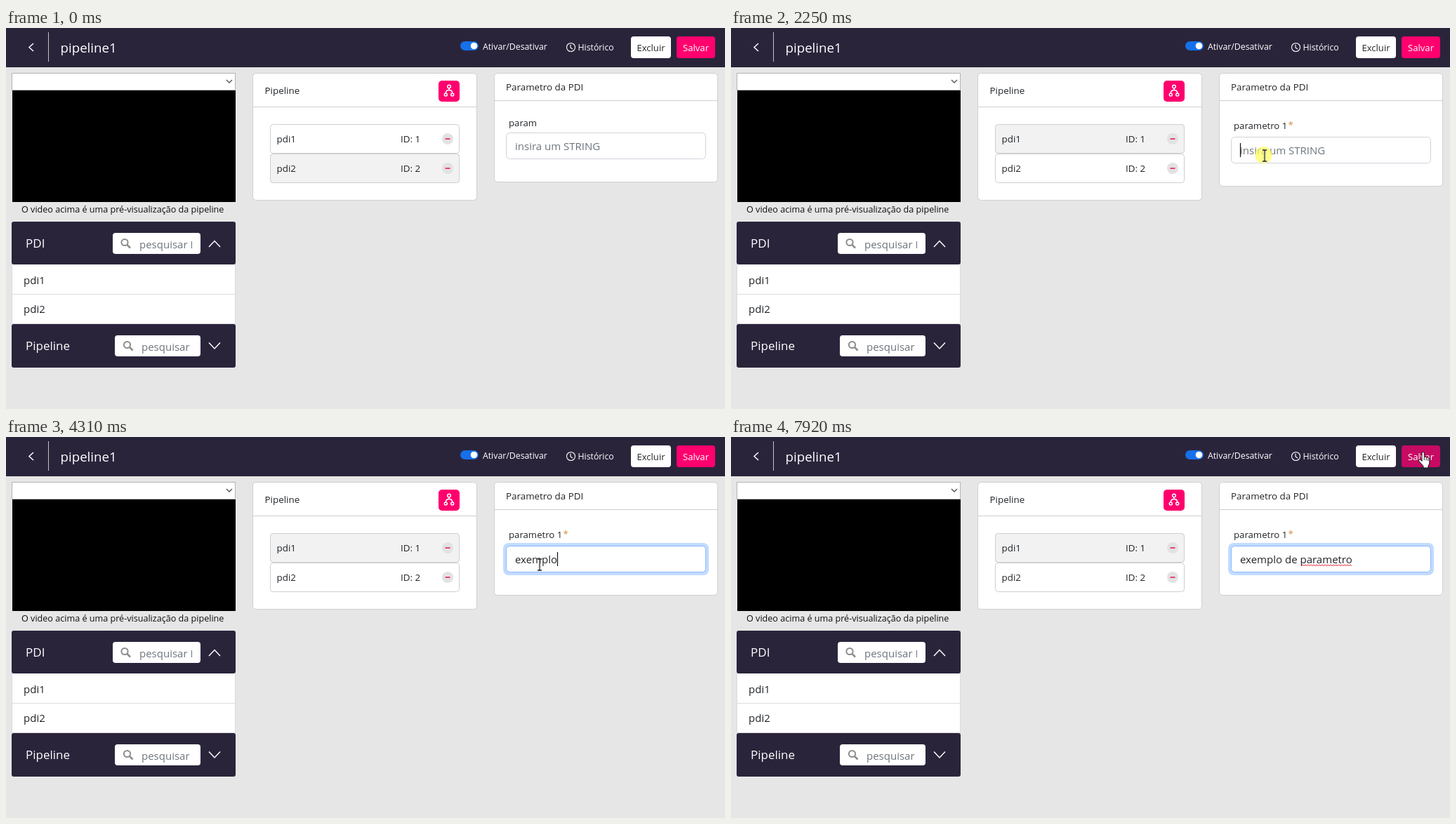
An HTML page that plays this animation: 1024x543 px, repeating every 8 s.

```html
<!DOCTYPE html>
<html lang="pt">
<head>
<meta charset="utf-8">
<title>Pipeline</title>
<style>
html, body { margin: 0; width: 100%; height: 100%; overflow: hidden; background: #e6e6e6; }
svg.stage { display: block; width: 100%; height: 100%; }
text { font: 13.4px "Open Sans", "Noto Sans", sans-serif; fill: #212529; white-space: pre; }
.small { font-size: 12.3px; }
.field { font-size: 15px; }
.head { font-size: 17px; }
.title { font-size: 18.7px; }
.label { font-size: 13.2px; }
.mid { text-anchor: middle; font-size: 13.1px; }
.white { fill: #fff; }
.hint { fill: #6c757d; }
.dark { fill: #2a243b; }
.card { fill: #fff; stroke: #cfcfcf; }
.line { fill: none; stroke: #fff; stroke-width: 1.5; }
.input { fill: #fff; stroke: #ced4da; }
.option { font-size: 11.3px; font-weight: 700; fill: #90909a; }

.before, .after, .arrow, .hand, .beam, .wave { animation: 8s step-end infinite; }
.before { animation-name: before; }
.after { animation-name: after; }
.arrow { animation-name: arrow; }
.hand { animation-name: hand; }
.beam { animation-name: beam; }
.wave { animation-name: wave; }
.focus { animation: focus 8s linear infinite; }
.menu { animation: menu 8s linear infinite; }
.press { animation: press 8s linear infinite; }
.save { animation: save 8s linear infinite; }
.pointer { animation: move 8s ease-in-out infinite; }

@keyframes before { 0% { opacity: 1 } 18.6%, 100% { opacity: 0 } }
@keyframes after { 0% { opacity: 0 } 18.6%, 100% { opacity: 1 } }
@keyframes arrow { 0% { opacity: 1 } 10.5% { opacity: 0 } 21.8% { opacity: 1 } 23.3% { opacity: 0 } 85.4% { opacity: 1 } 98%, 100% { opacity: 0 } }
@keyframes hand { 0% { opacity: 0 } 10.5% { opacity: 1 } 21.8% { opacity: 0 } 98%, 100% { opacity: 1 } }
@keyframes beam { 0% { opacity: 0 } 23.3% { opacity: 1 } 85.4%, 100% { opacity: 0 } }
@keyframes wave { 0% { opacity: 0 } 83.875%, 100% { opacity: 1 } }
@keyframes focus { 0%, 28.4% { opacity: 0 } 30.1%, 100% { opacity: 1 } }
@keyframes menu { 0%, 28.8% { opacity: 0 } 30.1%, 37.3% { opacity: 1 } 39.6%, 100% { opacity: 0 } }
@keyframes press {
  0%, 16.9% { opacity: 0 } 17.1%, 18.2% { opacity: 1 } 18.8%, 28.1% { opacity: 0 }
  28.12%, 28.7% { opacity: .85 } 29.8%, 100% { opacity: 0 }
}
@keyframes save { 0%, 98% { fill: #ff006e } 98.9%, 100% { fill: #c70a63 } }
@keyframes move {
  0%, 4.2% { transform: translate(930px, 565px) }
  4.25% { transform: translate(926px, 535px); animation-timing-function: cubic-bezier(.35, .15, .35, 1) }
  14.125%, 14.5% { transform: translate(551px, 174px) }
  17.1%, 18.9% { transform: translate(536px, 159px); animation-timing-function: cubic-bezier(.5, 0, .8, .8) }
  21.6% { transform: translate(636px, 138px); animation-timing-function: cubic-bezier(.2, .2, .5, 1) }
  24.5%, 24.8% { transform: translate(757px, 180px) }
  25.625%, 83.8% { transform: translate(758.5px, 181px) }
  85.4% { transform: translate(753px, 194px) }
  90.5%, 93.3% { transform: translate(772px, 250px) }
  99%, 100% { transform: translate(983px, 21px) }
}
</style>
</head>
<body>
<svg class="stage" viewBox="0 0 1024 543">
  <defs>
    <g id="minus">
      <circle r="8" fill="#e2e2e4"/>
      <path d="M-3.5 0h7" stroke="#e8345f" stroke-width="1.8"/>
    </g>
    <g id="lens" fill="none" stroke="#8d8d8d" stroke-width="2">
      <circle r="4.6"/>
      <path d="M3.4 3.4L8 8" stroke-width="2.6"/>
    </g>
  </defs>

  <!-- top bar -->
  <rect class="dark" width="1024" height="56"/>
  <path class="line" d="M39 22l-6 5.5 6 5.5"/>
  <path d="M60.5 6v42" stroke="#c3c1c9"/>
  <text class="title white" x="77.5" y="35">pipeline1</text>
  <rect x="647" y="19" width="26" height="13" rx="6.5" fill="#1670ea"/>
  <circle cx="666.5" cy="25.5" r="4.8" fill="#fff"/>
  <text class="small white" x="679" y="31">Ativar/Desativar</text>
  <g class="line" style="stroke-width:1.1">
    <circle cx="804.5" cy="27.5" r="6"/>
    <path d="M804 23.5v4.5l3 2"/>
  </g>
  <text class="small white" x="814.5" y="32">Histórico</text>
  <rect x="890" y="12" width="57" height="31" rx="4" fill="#fff"/>
  <text class="mid" x="918.5" y="33">Excluir</text>
  <rect class="save" x="955" y="12" width="55" height="31" rx="4" fill="#ff006e"/>
  <text class="mid white" x="982.5" y="33">Salvar</text>

  <!-- left column -->
  <rect x="8.5" y="64.5" width="318" height="24" fill="#fff" stroke="#b4b4b4"/>
  <path d="M314 74l4 4 4-4" fill="none" stroke="#555" stroke-width="1.4"/>
  <rect x="9" y="89" width="318" height="159"/>
  <text x="22" y="263" style="font-size:12.6px;fill:#111">O video acima é uma pré-visualização da pipeline</text>

  <rect x="8.5" y="336.5" width="318" height="85" fill="#fff" stroke="#dcdce0"/>
  <path d="M9 379.5h317" stroke="#dcdce0"/>
  <text class="field" x="25" y="365">pdi1</text>
  <text class="field" x="25" y="406">pdi2</text>

  <rect class="dark" x="8" y="276" width="319" height="61" rx="3"/>
  <text class="head white" x="28" y="313">PDI</text>
  <rect x="152" y="292" width="125" height="30" rx="4" fill="#fff"/>
  <use href="#lens" x="169" y="305.5"/>
  <svg x="190" y="292" width="75" height="30"><text class="field hint" y="22">pesquisar PDI</text></svg>
  <path class="line" d="M289 312l8-8.5 8 8.5"/>

  <rect class="dark" x="8" y="422" width="319" height="62" rx="3"/>
  <text class="head white" x="28" y="459">Pipeline</text>
  <rect x="155" y="438" width="122" height="30" rx="4" fill="#fff"/>
  <use href="#lens" x="172.5" y="451.5"/>
  <svg x="193" y="438" width="71" height="30"><text class="field hint" y="22">pesquisar Pipeline</text></svg>
  <path class="line" d="M289 448.500l8 8.500 8-8.500"/>

  <!-- pipeline card -->
  <rect class="card" x="351.5" y="64.500" width="319" height="181" rx="5"/>
  <path d="M352 112.500h318" stroke="#cfcfcf"/>
  <text x="368.500" y="94">Pipeline</text>
  <rect x="616" y="75" width="30" height="30" rx="5" fill="#ff006e"/>
  <g class="line">
    <circle cx="631" cy="83.500" r="2.300"/>
    <circle cx="626.300" cy="95" r="2"/>
    <circle cx="635.700" cy="95" r="2"/>
    <path d="M631 86v2.500M626.300 93c0-3 2-4.500 4.700-4.500s4.700 1.500 4.700 4.500"/>
  </g>
  <rect class="card" x="376.500" y="137.500" width="269" height="41" rx="4"/>
  <rect class="card" x="376.500" y="179.500" width="269" height="41" rx="4"/>
  <rect class="card after" x="376.500" y="137.500" width="269" height="41" rx="4" style="fill:#f2f2f2"/>
  <rect class="card before" x="376.500" y="179.500" width="269" height="41" rx="4" style="fill:#f2f2f2"/>
  <text x="385.500" y="163">pdi1</text>
  <text x="562" y="163">ID: 1</text>
  <use href="#minus" x="629" y="158"/>
  <text x="385.500" y="205">pdi2</text>
  <text x="562" y="205">ID: 2</text>
  <use href="#minus" x="629" y="200"/>

  <!-- parameter card -->
  <g class="before">
    <rect class="card" x="695.500" y="64.500" width="318" height="155" rx="5"/>
    <text class="label" x="716" y="140">param</text>
    <rect class="input" x="712.500" y="149.500" width="284" height="37" rx="5"/>
    <text class="field hint" x="725" y="174">insira um STRING</text>
  </g>
  <g class="after">
    <rect class="card" x="695.500" y="64.500" width="318" height="161" rx="5"/>
    <text class="label" x="716" y="144">parametro 1</text>
    <text class="label" x="793.500" y="143" style="fill:#d98a3d">*</text>
    <rect class="input" x="712.500" y="155.500" width="284" height="37" rx="5"/>
    <g class="focus">
      <rect x="708" y="151" width="293" height="46" rx="8" fill="#c2dbfe"/>
      <rect x="712.500" y="155.500" width="284" height="37" rx="5" fill="#fff" stroke="#86b7fe"/>
    </g>
    <text class="field hint" id="hint" x="725" y="180">insira um STRING</text>
    <text class="field" id="typed" x="725" y="180"></text>
    <path id="caret" d="M.5 164v20" stroke="#111" stroke-width="1.200"/>
    <path class="wave" id="wave" fill="none" stroke="#e8262d" stroke-width="1"/>
  </g>
  <path d="M696 103.500h317" stroke="#cfcfcf"/>
  <text x="712" y="89">Parametro da PDI</text>

  <g class="menu" id="menu">
    <rect x="713" y="197" width="286" height="158.500" rx="3" fill="#fff" style="filter:drop-shadow(0 1px 2px #0005)"/>
  </g>

  <!-- pointer -->
  <g class="pointer">
    <circle class="press" r="12" fill="#ffff58" opacity="0" fill-opacity=".85"/>
    <path class="arrow" d="M0 0V16.500L3.800 13l2.500 5.800 2.600-1.100L6.500 12h5.200z" fill="#fff" stroke="#000"/>
    <g class="hand" stroke="#111" fill="#fff" stroke-linejoin="round">
      <path d="M1 2.500Q1-.2 2.700.2 4.300.5 4.300 2.500V7.500Q6.200 6.200 7.200 8.300 9 7.200 9.700 9 11.800 8.400 11.800 11V16Q11.800 18 10 20V23H3V20.500L-3 13.800Q-4.500 11.600-2.800 11-1 10.600 1 13.500z"/>
      <path d="M4.300 8v4M7.200 9v3.500M9.700 10v3" fill="none" stroke-width=".9"/>
    </g>
    <g class="beam" fill="none">
      <path id="bar" d="M-1.500-7h2.200q.8 0 .8 1V8q0 1-.8 1h-2.200M4.500-7H2.300q-.8 0-.8 1M4.500 9H2.300q-.8 0-.8-1" stroke="#fff" stroke-width="2.600"/>
      <path d="M-1.500-7h2.200q.8 0 .8 1V8q0 1-.8 1h-2.200M4.500-7H2.300q-.8 0-.8 1M4.500 9H2.300q-.8 0-.8-1" stroke="#111" stroke-width="1.300"/>
    </g>
  </g>
</svg>
<script>
const LOOP = 8000, FOCUS = 2250, BLINK = 535, LEFT = 725;
const phrase = "exemplo de parametro";
const keys = [2990, 3130, 3650, 3750, 3980, 4080, 4310, 4410, 4510, 4610,
  4720, 4820, 4920, 5120, 5220, 5450, 5630, 5880, 6040, 6170];
const [hint, typed, caret, wave, menu] =
  ["hint", "typed", "caret", "wave", "menu"].map(id => document.getElementById(id));

["a", "c", "25x30", "b"].forEach((word, i) => {
  const option = document.createElementNS("http://www.w3.org/2000/svg", "text");
  option.setAttribute("class", "option");
  option.setAttribute("x", LEFT);
  option.setAttribute("y", 226.5 + 36 * i);
  option.textContent = word;
  menu.append(option);
});

wave.setAttribute("d", "M812 183.500" + "l2-1.500 2 1.500".repeat(18));

let start;
function draw(now) {
  start ??= now;
  const t = (now - start) % LOOP;
  const count = keys.filter(k => k <= t).length;
  const last = count ? keys[count - 1] : FOCUS;
  const text = phrase.slice(0, count);
  if (typed.textContent !== text) typed.textContent = text;
  hint.style.opacity = count ? 0 : 1;
  const on = t >= FOCUS && (t - last) % (2 * BLINK) < BLINK;
  caret.style.opacity = on ? 1 : 0;
  const width = count ? typed.getComputedTextLength() : 0;
  caret.setAttribute("transform", `translate(${Math.round(LEFT + width)} 0)`);
  requestAnimationFrame(draw);
}
requestAnimationFrame(draw);
</script>
</body>
</html>
```
